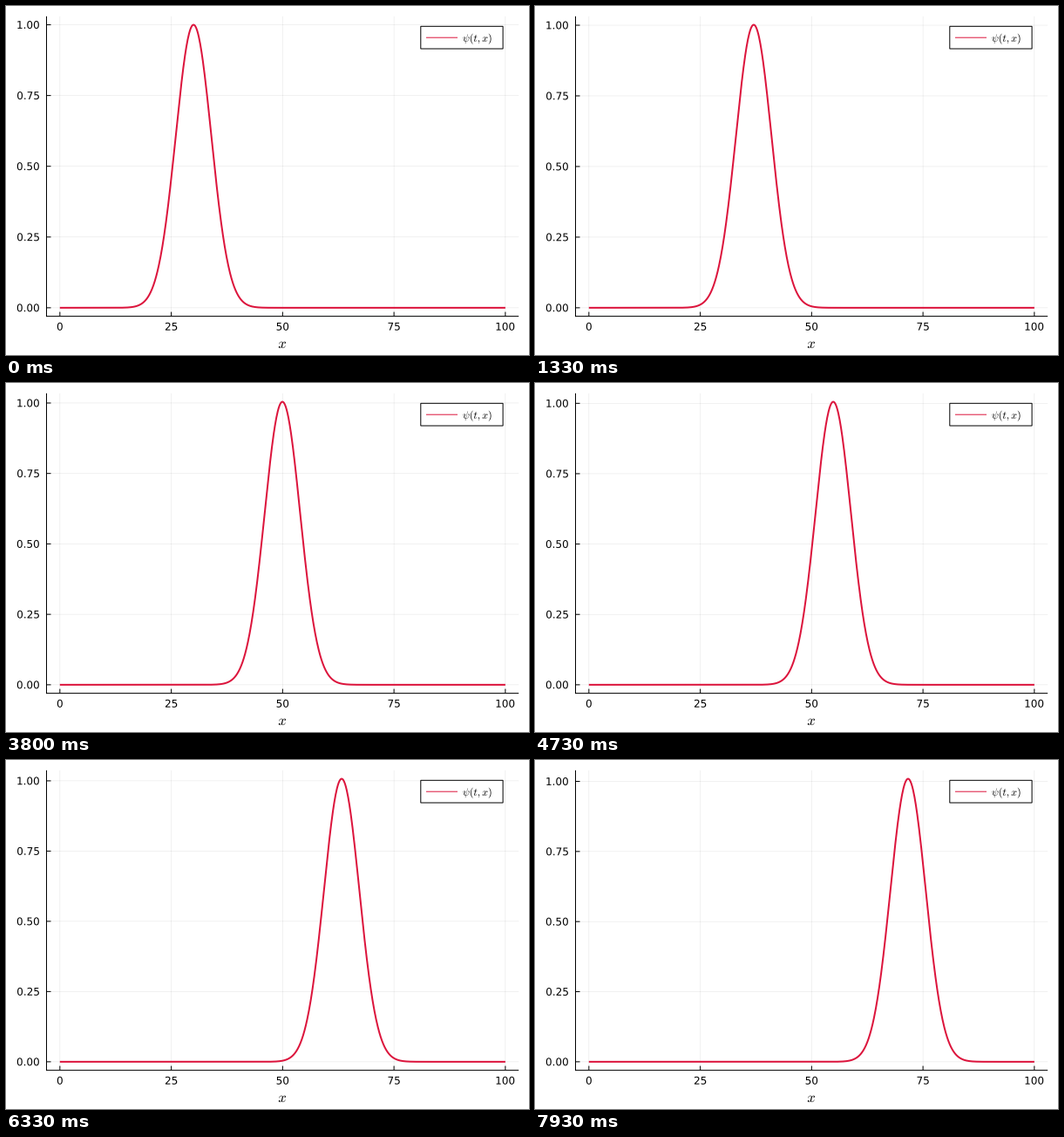
Animation, 600 px wide and 400 px high, one loop 8 s. Source, as a matplotlib script:

```python
import numpy as np
import matplotlib.pyplot as plt
from matplotlib.animation import FuncAnimation
from matplotlib.patches import PathPatch, Rectangle
from matplotlib.textpath import TextPath
from matplotlib.transforms import Affine2D

W, H, DPI = 600, 400, 100
PT = 72 / DPI                      # points per pixel
LOOP, TICK, STEPS = 8000, 20, 120  # loop and timer in ms, pulse steps per loop

LEFT, RIGHT, TOP, BOTTOM = 46.5, 588.2, 11.8, 355.6
PAD = 0.03 / 1.06                  # margin share on each side
X0 = LEFT + PAD * (RIGHT - LEFT)
X_SCALE = (RIGHT - LEFT) / 106
Y0 = BOTTOM - PAD * (BOTTOM - TOP)
Y_SPAN = (BOTTOM - TOP) / 1.06
LABEL_X = 37.9

START, SHIFT = 30, 0.35            # pulse centre and shift per step
VAR, SHARPEN = 16, 0.007           # variance and its loss per unit travelled
CRIMSON = "#dc143c"

fig = plt.figure(figsize=(W / DPI, H / DPI), dpi=DPI, facecolor="white")
ax = fig.add_axes([0, 0, 1, 1])
ax.set_xlim(0, W)
ax.set_ylim(H, 0)
ax.axis("off")


def line(xs, ys, width=1.0, color="black", z=2, **kw):
    return ax.plot(xs, ys, color=color, lw=width * PT, zorder=z, snap=False,
                   solid_capstyle="butt", solid_joinstyle="round", **kw)[0]


def grid(xs, ys):
    return line(xs, ys, 0.55, z=1, alpha=0.1)


def place(patch, x, y):
    patch.set_transform(Affine2D().scale(1, -1).translate(x, y) + ax.transData)


def label(s, size, x, y, align=0.5):
    """Draw text centred vertically on y; align 0.5 centres, 1 aligns right."""
    prop = {"family": "DejaVu Sans", "math_fontfamily": "cm"}
    path = TextPath((0, 0), s, size=size, prop=prop)
    box = path.get_extents()
    shift = Affine2D().translate(-box.x0 - align * box.width,
                                 -(box.y0 + box.y1) / 2)
    patch = PathPatch(path.transformed(shift), fc="black", lw=0, zorder=6)
    ax.add_patch(patch)
    place(patch, x, y)
    return patch


# Horizontal axis
for v in (0, 25, 50, 75, 100):
    x = X0 + v * X_SCALE
    grid([x, x], [TOP, BOTTOM])
    line([x, x], [BOTTOM, BOTTOM - 5])
    label(str(v), 12, x, 367.3)
label("$x$", 16.5, 316.9, 388.4)

# Vertical axis, rescaled as the peak grows
levels = []
for v in (0, 0.25, 0.5, 0.75, 1):
    rule = grid([LEFT, RIGHT], [Y0, Y0])
    tick = line([LEFT, LEFT + 5], [Y0, Y0])
    levels.append((v, rule, tick, label(f"{v:.2f}", 12, LABEL_X, Y0, 1)))

line([LEFT, LEFT], [TOP, BOTTOM + 0.5])
line([LEFT - 0.5, RIGHT], [BOTTOM, BOTTOM])

xs = np.linspace(0, 100, 1001)
curve = line(X0 + xs * X_SCALE, np.full_like(xs, Y0), 2, CRIMSON, 3)

# Legend
ax.add_patch(Rectangle((475.8, 23.3), 94.3, 25.7, fc="white", ec="black",
                       lw=PT, zorder=4, snap=False))
line([482, 518], [36.2, 36.2], 1, CRIMSON, 5)
label(r"$\psi(t,x)$", 12, 540.4, 37.7)


def draw(i):
    # The pulse holds still between steps, so pick the step this tick reaches.
    step = (i * TICK + TICK - 1) * STEPS // LOOP
    travel = SHIFT * step
    var = VAR - SHARPEN * travel
    peak = np.sqrt(VAR / var)
    shape = np.exp(-(xs - START - travel) ** 2 / (2 * var))
    curve.set_ydata(Y0 - Y_SPAN * shape)
    for v, rule, tick, text in levels:
        y = Y0 - Y_SPAN * v / peak
        rule.set_ydata([y, y])
        tick.set_ydata([y, y])
        place(text, LABEL_X, y)
    return []


anim = FuncAnimation(fig, draw, frames=LOOP // TICK, interval=TICK,
                     init_func=lambda: draw(0), repeat=True, repeat_delay=0)
plt.show()
```
